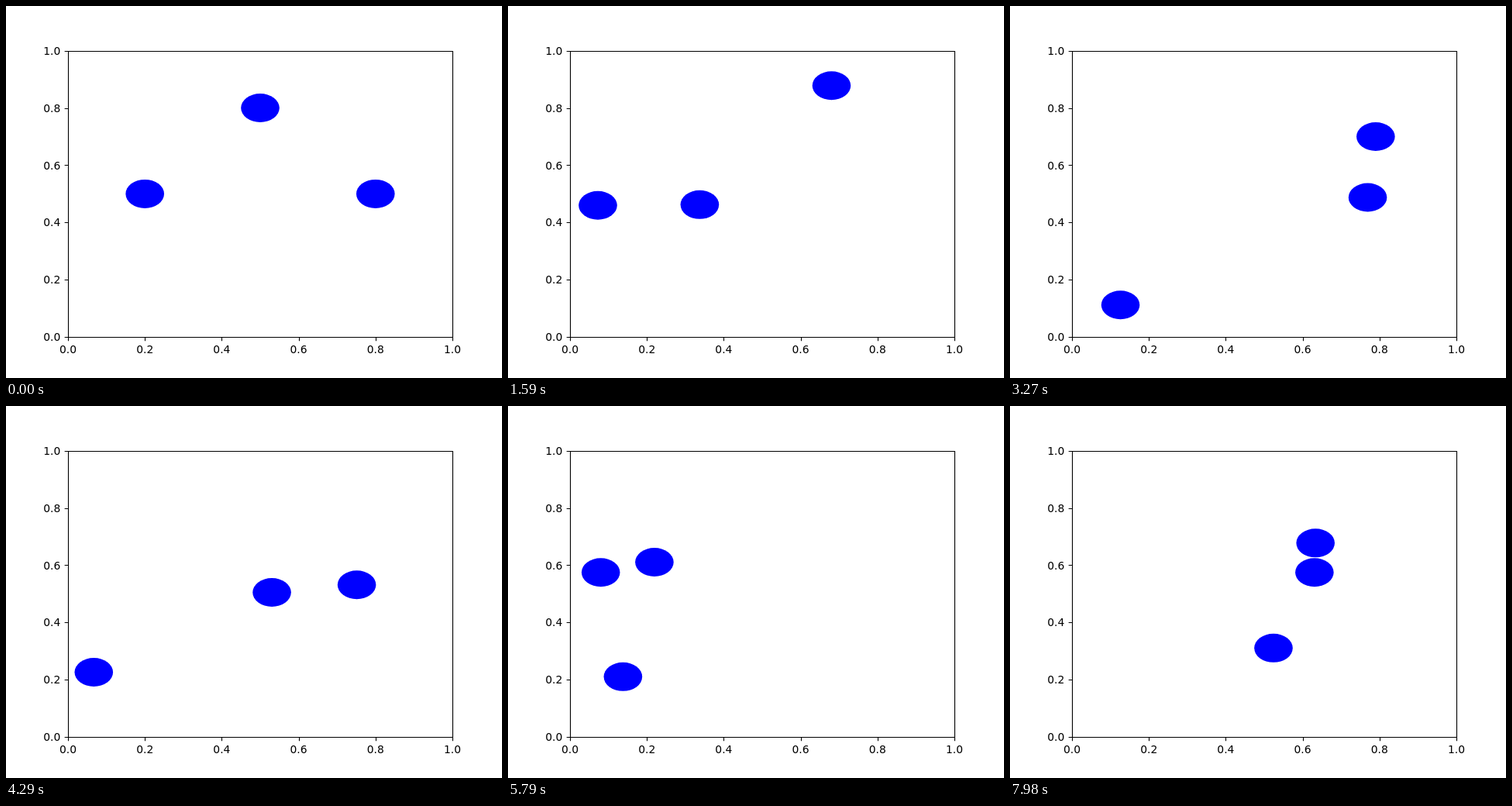
These frames come from a looping animation (640x480 px, 8000 ms). An HTML page:

```html
<!DOCTYPE html>
<html lang="en">
<head>
<meta charset="utf-8">
<title>Bouncing balls</title>
<style>
  html, body { margin: 0; width: 100%; height: 100%; overflow: hidden; background: #fff; }
  svg { display: block; width: 640px; height: 480px; }
  text { font: 13.889px "DejaVu Sans", sans-serif; }
  .frame { fill: none; stroke: #000; stroke-width: 1.11; }
  ellipse { fill: #00f; }
</style>
</head>
<body>
<svg viewBox="0 0 640 480"></svg>
<script>
const FRAME_MS = 30, LOOP_MS = 8000, RADIUS = 0.05;
const LEFT = 80, BOTTOM = 427.2, WIDTH = 496, HEIGHT = 369.6;
const svg = document.querySelector('svg');
const toX = x => LEFT + WIDTH * x;
const toY = y => BOTTOM - HEIGHT * y;
const snap = v => Math.floor(v + 0.5) + 0.5;

function add(tag, attrs, text = '') {
  const node = document.createElementNS('http://www.w3.org/2000/svg', tag);
  for (const key in attrs) node.setAttribute(key, attrs[key]);
  node.textContent = text;
  svg.append(node);
  return node;
}

// Time until a ball touches a wall along one axis.
function wallTime(pos, vel) {
  if (vel > 0) return (1 - RADIUS - pos) / vel;
  return vel < 0 ? (RADIUS - pos) / vel : Infinity;
}

// Time until two balls touch; infinite if they miss or move apart.
function pairTime(p, q) {
  const dx = q.x - p.x, dy = q.y - p.y, dvx = q.vx - p.vx, dvy = q.vy - p.vy;
  const a = dvx * dvx + dvy * dvy, b = dx * dvx + dy * dvy;
  const disc = b * b - a * (dx * dx + dy * dy - 4 * RADIUS * RADIUS);
  return b < 0 && disc > 0 ? Math.max(0, (-b - Math.sqrt(disc)) / a) : Infinity;
}

// Elastic bounce of equal masses along the line of centres.
function collide(p, q) {
  const dx = q.x - p.x, dy = q.y - p.y;
  const k = ((q.vx - p.vx) * dx + (q.vy - p.vy) * dy) / (dx * dx + dy * dy);
  p.vx += k * dx; p.vy += k * dy;
  q.vx -= k * dx; q.vy -= k * dy;
}

// One frame moves a full step, or only as far as the next impact.
function step(balls) {
  let dt = 1, impact = null;
  const offer = (t, action) => { if (t < dt) { dt = t; impact = action; } };
  balls.forEach((p, i) => {
    offer(wallTime(p.x, p.vx), () => { p.vx = -p.vx; });
    offer(wallTime(p.y, p.vy), () => { p.vy = -p.vy; });
    for (const q of balls.slice(i + 1)) offer(pairTime(p, q), () => collide(p, q));
  });
  for (const p of balls) { p.x += p.vx * dt; p.y += p.vy * dt; }
  if (impact) impact();
}

const balls = [
  { x: 0.2, y: 0.5, vx: 0.008, vy: 0.006 },
  { x: 0.8, y: 0.5, vx: -0.012, vy: 0 },
  { x: 0.5, y: 0.8, vx: -0.004, vy: -0.006 },
];
const poses = [];
for (let i = 0; i * FRAME_MS < LOOP_MS; i++) {
  poses.push(balls.map(({ x, y }) => [toX(x), toY(y)]));
  step(balls);
}

const dots = balls.map(() => add('ellipse', { rx: RADIUS * WIDTH, ry: RADIUS * HEIGHT }));

const x0 = snap(toX(0)), x1 = snap(toX(1)), y0 = snap(toY(0)), y1 = snap(toY(1));
let lines = `M${x0} ${y0}H${x1}V${y1}H${x0}Z`;
for (let i = 0; i <= 5; i++) {
  const value = i / 5, x = toX(value), y = toY(value), label = value.toFixed(1);
  lines += `M${snap(x)} ${y0}v4.86M${x0} ${snap(y)}h-4.86`;
  add('text', { x, y: 448, 'text-anchor': 'middle' }, label);
  add('text', { x: 70.3, y: Math.round(y + 5.1), 'text-anchor': 'end' }, label);
}
add('path', { class: 'frame', d: lines });

function draw(now) {
  const pose = poses[Math.floor((now % LOOP_MS) / FRAME_MS)];
  dots.forEach((dot, i) => {
    dot.setAttribute('cx', pose[i][0]);
    dot.setAttribute('cy', pose[i][1]);
  });
}

const start = performance.now();
function tick() {
  draw(performance.now() - start);
  requestAnimationFrame(tick);
}
tick();
</script>
</body>
</html>
```
